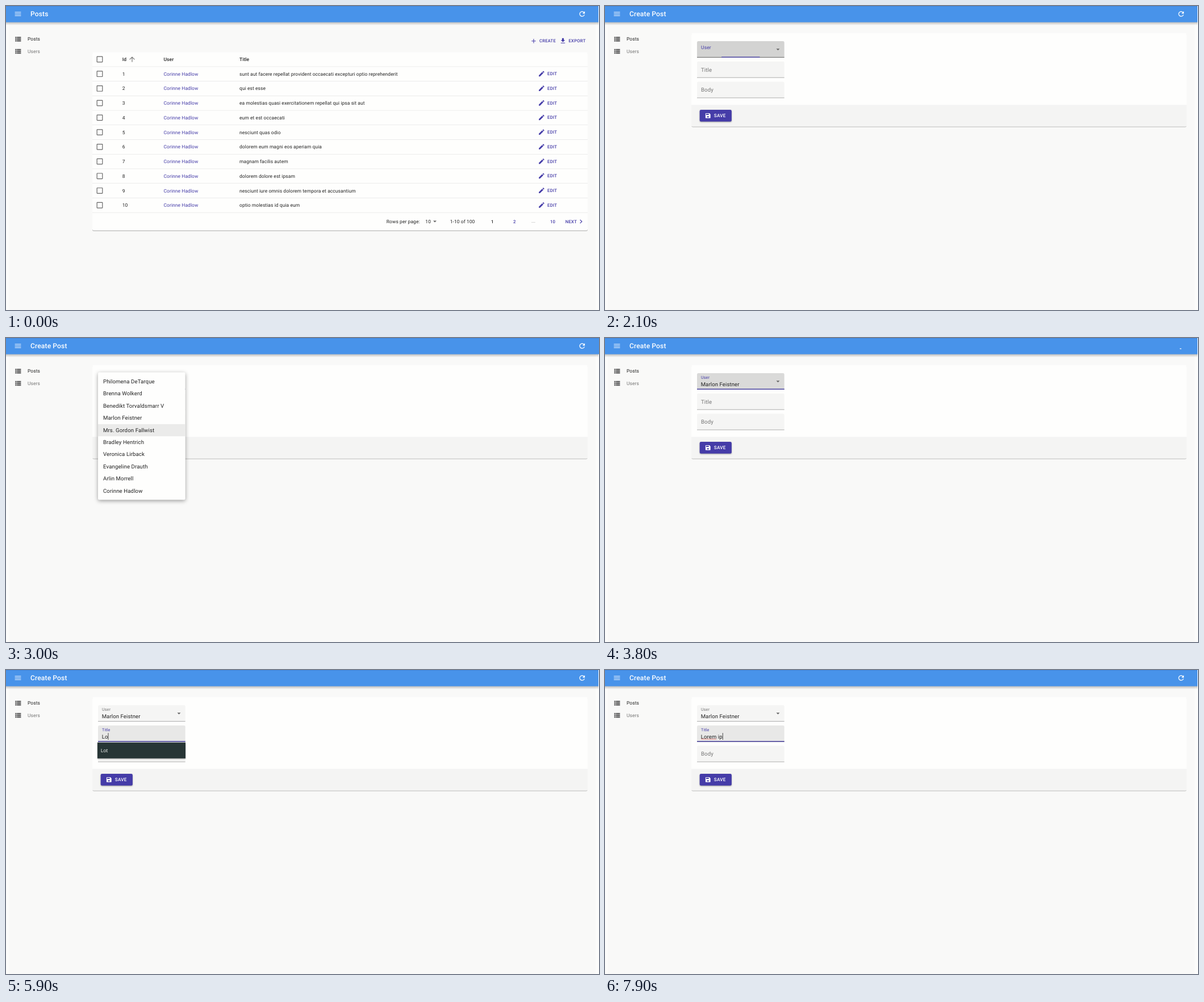
An HTML page for the animation above (8000 ms loop, 1044x536 px).

```html
<!DOCTYPE html>
<html lang="en">
<head>
<meta charset="utf-8">
<title>Posts admin</title>
<style>
html, body { margin: 0; width: 100%; height: 100%; overflow: hidden; background: #fff; }
svg { display: block; width: 100vw; height: 100vh; }
text { font-family: Roboto, Arial, sans-serif; text-rendering: geometricPrecision; white-space: pre; letter-spacing: .0107em; }
.card { filter: drop-shadow(0 1px .7px rgba(0,0,0,.32)); }
.raised { filter: drop-shadow(0 1.4px 1.3px rgba(0,0,0,.35)); }
.menu { filter: drop-shadow(0 2.5px 3.5px rgba(0,0,0,.38)); }
.popup text { font-family: "Noto Sans", "Open Sans", sans-serif; font-weight: 500; letter-spacing: 0; }
</style>
</head>
<body>
<svg id="stage" viewBox="0 0 1044 536" preserveAspectRatio="none"></svg>
<script>
const LOOP = 8000;
const INK = '#232323', GRAY = '#757575', PRIMARY = '#453ca8', BLUE = '#4893ea';
const BODY = 8.45, INPUT = 9.62, BUTTON = 7.8;

const ICONS = {
  menu: 'M3 18h18v-2H3zm0-5h18v-2H3zm0-7v2h18V6z',
  refresh: 'M17.65 6.35C16.2 4.9 14.21 4 12 4c-4.42 0-8 3.58-8 8s3.58 8 8 8c3.73 0 6.84-2.55 7.73-6h-2.08c-.82 2.33-3.04 4-5.65 4-3.31 0-6-2.69-6-6s2.69-6 6-6c1.66 0 3.14.69 4.22 1.78L13 11h7V4z',
  list: 'M4 14h4v-4H4zm0 5h4v-4H4zM4 9h4V5H4zm5 5h12v-4H9zm0 5h12v-4H9zM9 5v4h12V5z',
  box: 'M19 5v14H5V5h14m0-2H5c-1.1 0-2 .9-2 2v14c0 1.1.9 2 2 2h14c1.1 0 2-.9 2-2V5c0-1.1-.9-2-2-2z',
  edit: 'M3 17.25V21h3.75L17.81 9.94l-3.75-3.75zM20.71 7.04c.39-.39.39-1.02 0-1.41l-2.34-2.34c-.39-.39-1.02-.39-1.41 0l-1.83 1.83 3.75 3.75z',
  add: 'M19 13h-6v6h-2v-6H5v-2h6V5h2v6h6z',
  download: 'M19 9h-4V3H9v6H5l7 7zM5 18v2h14v-2z',
  up: 'M4 12l1.41 1.41L11 7.83V20h2V7.83l5.58 5.59L20 12l-8-8z',
  caret: 'M7 10l5 5 5-5z',
  next: 'M10 6L8.59 7.41 13.17 12l-4.58 4.59L10 18l6-6z',
  save: 'M17 3H5c-1.11 0-2 .9-2 2v14c0 1.1.89 2 2 2h14c1.1 0 2-.9 2-2V7zm-5 16c-1.66 0-3-1.34-3-3s1.34-3 3-3 3 1.34 3 3-1.34 3-3 3zm3-10H5V5h10z'
};
const POSTS = [
  'sunt aut facere repellat provident occaecati excepturi optio reprehenderit',
  'qui est esse',
  'ea molestias quasi exercitationem repellat qui ipsa sit aut',
  'eum et est occaecati',
  'nesciunt quas odio',
  'dolorem eum magni eos aperiam quia',
  'magnam facilis autem',
  'dolorem dolore est ipsam',
  'nesciunt iure omnis dolorem tempora et accusantium',
  'optio molestias id quia eum'
];
const USERS = ['Philomena DeTarque', 'Brenna Wolkerd', 'Benedikt Torvaldsmarr V', 'Marlon Feistner',
  'Mrs. Gordon Fallwist', 'Bradley Hentrich', 'Veronica Lirback', 'Evangeline Drauth', 'Arlin Morrell', 'Corinne Hadlow'];
const HINTS = ['test', 'DTiles', 'Market', 'Keyboard shortcuts in raids', '3 mins', 'fire crystal shards'];
const AUTHOR = USERS[9], PICKED = USERS[3];

// Markup helpers; text and icons are placed by their vertical centre.
const rect = (x, y, w, h, fill, extra = '') => `<rect x="${x}" y="${y}" width="${w}" height="${h}" fill="${fill}" ${extra}/>`;
const text = (x, y, str, size = BODY, fill = INK, extra = '') =>
  `<text x="${x}" y="${y + size * .355}" font-size="${size}" fill="${fill}" ${extra}>${str}</text>`;
const strong = (x, y, str, size = BUTTON, fill = PRIMARY, extra = '') =>
  text(x, y, str, size, fill, `font-weight="500" ${extra}`);
const icon = (name, x, y, fill, scale = .6, extra = '') =>
  `<path d="${ICONS[name]}" fill="${fill}" transform="translate(${x} ${y}) scale(${scale}) translate(-12 -12)" ${extra}/>`;
const group = (id, content, extra = '') => `<g id="${id}" ${extra}>${content}</g>`;
const caps = 'style="letter-spacing:.028em"';

const shell = () =>
  rect(0, 0, 1043, 536, '#fcfcfb') + rect(5, 0, 1033, 536, '#f9f9f8') +
  rect(0, 28, 1043, 6, 'url(#shade)') +
  rect(0, 0, 1043, 28.6, BLUE, 'id="bar"') + rect(0, 0, 1043, .8, '#3f83d6', 'id="barEdge"') +
  icon('menu', 21, 14, '#fff') + strong(43, 14, 'Posts', 12.05, '#fff', 'id="heading"') +
  icon('refresh', 1014.3, 14, '#fff', .6, 'id="refresh"') +
  '<circle id="spinner" cx="1014" cy="14" r="5" fill="none" stroke="#fff" stroke-width="1.2" pathLength="100"/>' +
  icon('list', 21, 58.5, '#666') + text(38, 58.5, 'Posts') +
  icon('list', 21, 80, '#666') + text(38, 80, 'Users', BODY, GRAY);

function postRow(title, i) {
  const y = 119.7 + i * 25.73;
  return icon('box', 165, y, '#666') + text(204.7, y, i + 1) + text(277.5, y, AUTHOR, BODY, PRIMARY) +
    text(411, y, title) + icon('edit', 942.9, y - .3, PRIMARY, .53) + strong(953, y - .2, 'EDIT', BUTTON, PRIMARY, caps) +
    rect(152, y + 12.6, 872, .6, '#e0e0e0');
}

const listPage = () => group('list',
  rect(920, 51, 52, 20, PRIMARY, 'id="hover" rx="2.4"') +
  '<circle id="ripple" cx="946" cy="61" fill="#453ca8" clip-path="url(#createClip)"/>' +
  icon('add', 929, 61.7, PRIMARY, .53) + strong(939, 61.5, 'CREATE', 7.65, PRIMARY, caps) +
  icon('download', 980.5, 61.5, PRIMARY, .53) + strong(990.5, 61.5, 'EXPORT', 7.7, PRIMARY, caps) +
  rect(152, 81.5, 872, 314.3, '#fefefd', 'rx="2.4" class="card"') +
  icon('box', 165, 94, '#666') + strong(204.7, 94, 'Id', BODY, INK) + icon('up', 222, 94, '#777') +
  strong(277.5, 94, 'User', BODY, INK) + strong(411, 94, 'Title', BODY, INK) +
  rect(152, 106.6, 872, .6, '#e0e0e0') + POSTS.map(postRow).join('') +
  text(669.8, 380, 'Rows per page:') + text(738.3, 380, '10') + icon('caret', 755, 379.8, '#666') +
  text(781.7, 380, '1-10 of 100') + strong(854, 380, '1', BUTTON, INK) + strong(893, 380, '2') +
  text(925, 379, '...', BODY, GRAY) + strong(958, 380, '10') +
  strong(984.7, 380, 'NEXT', BUTTON, PRIMARY, caps) + icon('next', 1012.3, 380, PRIMARY));

const field = (id, y, label) => group(id,
  `<path class="fill" d="M162 ${y + 28.6}v-26.2q0-2.4 2.4-2.4h148.9q2.4 0 2.4 2.4v26.2z"/>` +
  rect(162, y + 28, 153.7, .7, '#8f8f8f', 'class="line"') +
  rect(162, y + 27.5, 153.7, 1.3, PRIMARY, 'class="focus"') +
  `<text class="label" x="169">${label}</text>`, `data-y="${y}"`);

const formPage = () => group('form',
  rect(152, 47.8, 872, 164.6, '#fefefd', 'rx="2.4" class="card"') +
  rect(152, 174.4, 872, 38, '#f4f4f3') +
  field('user', 62, 'User') + icon('caret', 304.5, 76.5, '#666') + text(168.7, 81.6, PICKED, 9.55, INK, 'id="picked"') +
  field('title', 97.8, 'Title') + text(168.7, 117.2, '', 9.55, INK, 'id="typed"') +
  '<path id="spell" fill="none" stroke="#e0443e" stroke-width=".7"/>' +
  rect(168.8, 111, .8, 12, INK, 'id="cursor"') +
  field('body', 133.6, 'Body') +
  rect(166.7, 183, 56.2, 20.8, PRIMARY, 'rx="2.4" class="raised"') +
  icon('save', 181.3, 193.4, '#fff', .49) + strong(191.8, 193.4, 'SAVE', 8.2, '#fff', caps));

const menu = () => group('menu',
  rect(162, 60.6, 153.7, 224.7, '#fefefd', 'rx="2.4" class="menu"') +
  rect(162, 0, 153.7, 21.41, '#ebebea', 'id="option"') +
  USERS.map((name, i) => text(171, 76.6 + i * 21.41, name, 9.64)).join(''));

const popup = () => group('popup',
  rect(161, 127.8, 155, 126.6, '#273535', 'id="popupBox" class="raised"') +
  HINTS.map((hint, i) => text(166.7, 142 + i * 19.72, hint, 8.5, '#f1f2f0')).join(''), 'class="popup"');

const stage = document.getElementById('stage');
stage.innerHTML = `<defs>
  <linearGradient id="shade" x2="0" y2="1"><stop stop-opacity=".26"/><stop offset="1" stop-opacity="0"/></linearGradient>
  <clipPath id="createClip">${rect(920, 51, 52, 20, '#000', 'rx="2.4"')}</clipPath></defs>` +
  shell() + listPage() + formPage() + menu() + popup();

const $ = id => document.getElementById(id);
const set = (el, attrs) => { for (const key in attrs) el.setAttribute(key, attrs[key]); };
const show = (el, on) => { el.style.display = on ? '' : 'none'; };
const during = (t, a, b) => t >= a && t < b;
const ramp = (t, start, length) => Math.min(1, Math.max(0, (t - start) / length));
const easeOut = p => 1 - (1 - p) ** 3;
const latest = (t, steps) => steps.reduce((value, [at, next]) => t >= at ? next : value, steps[0][1]);

const HOVERED = [[2200, 0], [2600, 1], [2700, 2], [2900, 3], [3000, 4], [3200, 3]];
const TYPED = [[0, ''], [5700, 'L'], [5900, 'Lo'], [6100, 'Lor'], [6300, 'Lore'], [6500, 'Lorem'],
  [6600, 'Lorem '], [7100, 'Lorem o'], [7500, 'Lorem '], [7800, 'Lorem i'], [7900, 'Lorem ip']];

function setField(id, { fill = '#f5f5f4', raised = 0, focus = 0, dark = false }) {
  const el = $(id), y = +el.dataset.y, part = name => el.querySelector('.' + name);
  const size = INPUT * (1 - .25 * raised), width = 153.7 * focus;
  set(part('fill'), { fill });
  set(part('line'), { fill: dark ? '#333' : '#8f8f8f' });
  set(part('focus'), { x: 238.85 - width / 2, width });
  set(part('label'), { 'font-size': size, y: y + 14.4 - 6.9 * raised + size * .355, fill: focus ? PRIMARY : GRAY });
}

function drawSpinner(t) {
  const start = [1300, 3700].find(at => during(t, at, at + 300));
  show($('refresh'), !start);
  show($('spinner'), start);
  if (!start) return;
  const age = t - start, arc = 6 + 70 * (age / 700) ** 2 * 2;
  set($('spinner'), {
    'stroke-dasharray': `${arc} 100`,
    transform: `rotate(${56 + age * 360 / 1400} 1014 14)`
  });
}

function drawMenu(t) {
  const open = during(t, 2200, 3500);
  show($('menu'), open);
  const grow = easeOut(ramp(t, 2130, 260));
  set($('menu'), {
    opacity: grow * (1 - ramp(t, 3300, 200)),
    transform: `translate(238.85 76) scale(${.75 + .25 * grow} ${.5625 + .4375 * grow}) translate(-238.85 -76)`
  });
  set($('option'), { y: 151.9 + (latest(t, HOVERED) - 4) * 21.41 });
  for (const id of ['bar', 'barEdge']) set($(id), { width: open ? 1044 : 1043 });
}

function drawTyping(t) {
  const str = latest(t, TYPED);
  $('typed').textContent = str;
  const end = 168.8 + (str ? $('typed').getComputedTextLength() : 0);
  set($('cursor'), { x: end });
  show($('cursor'), t >= 4400 && !during(t, 4900, 5400));
  show($('spell'), t >= 6700);

  const filtered = t >= 5700;
  show($('popup'), during(t, 4500, 6000));
  set($('popupBox'), { height: filtered ? 28 : 126.6 });
  $('popup').querySelectorAll('text').forEach((el, i) => {
    show(el, !filtered || i === 0);
    if (i === 0) el.textContent = filtered ? 'Lot' : HINTS[0];
  });
}

function draw(t) {
  const creating = t >= 1200;
  show($('list'), !creating);
  show($('form'), creating);
  $('heading').textContent = creating ? 'Create Post' : 'Posts';
  set($('hover'), { opacity: .05 * ramp(t, 400, 200) });
  set($('ripple'), { r: 30 * easeOut(ramp(t, 950, 250)), opacity: t >= 1000 ? .2 : 0 });

  const userFocus = t < 2100 || t >= 4400 ? 0 : easeOut(ramp(t, 2065, 200));
  const titleFocus = t < 4400 ? 0 : easeOut(ramp(t, 4350, 200));
  setField('user', {
    fill: latest(t, [[0, '#f5f5f4'], [2100, '#d3d3d2'], [2200, '#dadad9'], [4400, '#f5f5f4']]),
    raised: t < 2100 ? 0 : easeOut(ramp(t, 2065, 200)),
    focus: userFocus, dark: during(t, 2100, 4100)
  });
  setField('title', {
    fill: latest(t, [[0, '#f5f5f4'], [4200, '#ececeb'], [4400, '#e8e8e7']]),
    raised: titleFocus, focus: titleFocus, dark: t >= 4200
  });
  setField('body', {});
  show($('picked'), t >= 3300);
  drawSpinner(t);
  drawMenu(t);
  drawTyping(t);
}

let wave = 'M169 121.9';
for (let i = 0; i < 9; i++) wave += 'q.75 -1.1 1.5 0t1.5 0';
set($('spell'), { d: wave });

const began = performance.now();
function tick() {
  const t = (performance.now() - began) % LOOP;
  draw(Math.floor(t / 100) * 100);
  requestAnimationFrame(tick);
}
tick();
</script>
</body>
</html>
```
